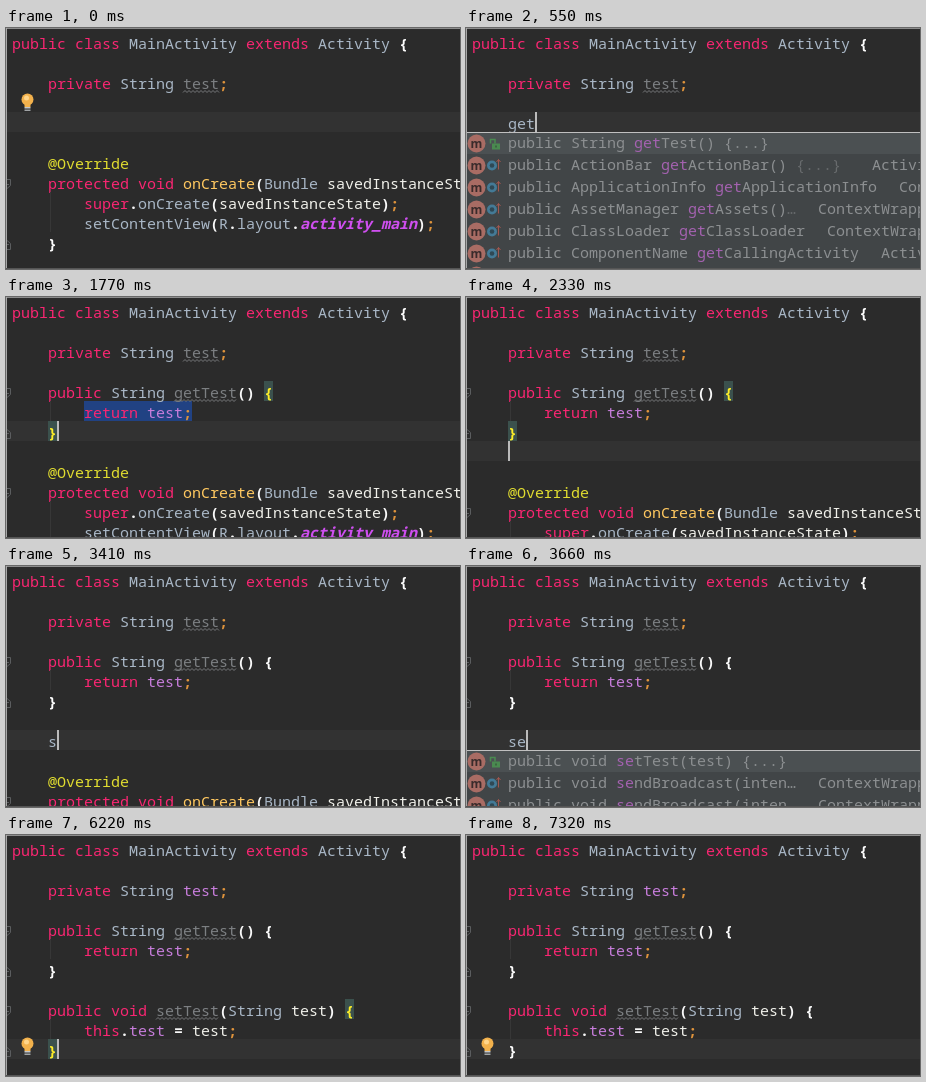
Animation of 454x241 px, one loop 7.42 s. Source, as an HTML page with a canvas:

```html
<!DOCTYPE html>
<html lang="en">
<head>
<meta charset="utf-8">
<title>Getter and setter completion</title>
<style>
  html, body { margin: 0; width: 100%; height: 100%; overflow: hidden; background: #2b2b2b; }
  canvas { display: block; }
</style>
</head>
<body>
<canvas id="stage" width="454" height="241"></canvas>
<script>
const ctx = document.getElementById('stage').getContext('2d');
const LOOP = 7420, CELL = 9, LINE = 20, LEFT = 6;
const MONO = '15px "Noto Sans Mono", "DejaVu Sans Mono", monospace';

const COLORS = {
  text: '#a9b7c6', key: '#f92672', brace: '#ffffff', match: '#ffef28', semi: '#e0943c',
  punct: '#f8f8f8', note: '#e0dc30', method: '#ffc860', field: '#c77ddb', unused: '#7c7f82',
  param: '#f0f0ea', res: '#cf4ff0', hit: '#a462b0', dim: '#686b6d', popup: '#8c8f91'
};
const BOLD = ['brace', 'match', 'semi', 'punct'];
// <style:text> sets a style by hand; the rest follows the syntax.
const TOKENS = /<(\w+):([^>]+)>|\b(public|class|extends|private|protected|void|return|super|this)\b|(@\w+)|([{}])|(;)|([().=])/g;
const SYNTAX = ['key', 'note', 'brace', 'semi', 'punct'];

const HEAD = ['public class MainActivity extends Activity {', ''];
const TAIL = [
  '', '    @Override',
  '    protected void <method:onCreate>(Bundle <param:savedInstanceState>) {',
  '        super.onCreate(<param:savedInstanceState>);',
  '        setContentView(R.layout.<res:activity_main>);',
  '    }'
];
const GET_ROWS = [
  ['public String <hit:get>Test() {...}'],
  ['public ActionBar <hit:get>ActionBar() <dim:{...}>', 'Activity', 406],
  ['public ApplicationInfo <hit:get>ApplicationInfo', 'Context', 433],
  ['public AssetManager <hit:get>Assets()<dim:…>', 'ContextWrapper', 352],
  ['public ClassLoader <hit:get>ClassLoader', 'ContextWrapper', 361],
  ['public ComponentName <hit:get>CallingActivity', 'Activity', 415],
  ['']
];
const SEND = ['public void <hit:se>ndBroadcast(inten…', 'ContextWrapper', 352];
const SE_ROWS = [['public void <hit:se>tTest(test) {...}'], SEND, SEND];
const SET_ROWS = [
  ['public void <hit:set>Test(test) {...}'],
  ['public void <hit:set>ContentView(view…', 'Activity', 406],
  ['public void <hit:set>ContentView(view…', 'Activity', 406]
];

// Last value whose start time has passed: [start, value, start, value, ...]
function at(t, steps) {
  let value;
  for (let i = 0; i < steps.length && t >= steps[i]; i += 2) value = steps[i + 1];
  return value;
}

function box(x, y, w, h, color) {
  ctx.fillStyle = color;
  ctx.fillRect(x, y, w, h);
}

function stroke(color, width, ...points) {
  ctx.strokeStyle = color;
  ctx.lineWidth = width;
  ctx.beginPath();
  points.forEach(([x, y]) => ctx.lineTo(x, y));
  ctx.stroke();
}

function disc(x, y, r, color) {
  ctx.fillStyle = color;
  ctx.beginPath();
  ctx.arc(x, y, r, 0, 7);
  ctx.fill();
}

function wave(x, y, width) {
  const points = [];
  for (let i = 0; i <= width; i += 2) points.push([x + i, y + (i % 4 ? 0 : 2)]);
  stroke('#77797b', 1, ...points);
}

function run(text, style, x, y) {
  const width = text.length * CELL;
  const face = BOLD.includes(style) ? 'bold ' : style === 'res' ? 'italic bold ' : '';
  if (style === 'match') box(x, y - 17, width, LINE, '#3b514d');
  ctx.font = face + MONO;
  ctx.fillStyle = COLORS[style];
  ctx.fillText(text, x, y);
  if (style === 'unused') wave(x, y + 1.5, width);
  return x + width;
}

function write(source, x, y, plain) {
  const base = plain ? 'popup' : 'text';
  let from = 0;
  for (const m of source.matchAll(TOKENS)) {
    x = run(source.slice(from, m.index), base, x, y);
    const kind = SYNTAX[m.slice(3).findIndex(Boolean)];
    x = run(m[2] || m[0], m[1] || (plain ? base : kind), x, y);
    from = m.index + m[0].length;
  }
  run(source.slice(from), base, x, y);
}

function fold(line, closing) {
  const y = line * LINE + 12, a = closing ? y + 9.5 : y - .5, d = closing ? -1 : 1;
  stroke('#5b5d5f', 1, [1, a], [4.5, a], [4.5, a + 6 * d], [1, a + 9 * d]);
  stroke('#5b5d5f', 1, [1, y + 4.5], [3, y + 4.5]);
}

function bulb(y) {
  disc(21.5, y + 6.5, 6, '#f2b14c');
  disc(20.5, y + 5, 2.5, '#ffd58a');
  box(18.5, y + 11, 6, 3, '#f2b14c');
  box(18.5, y + 14, 6, 1.5, '#c5c8ca');
  box(18.5, y + 16.5, 6, 1.5, '#a0a3a5');
}

function rowIcons(y, first) {
  disc(10.5, y, 9, '#a96c64');
  ctx.font = 'bold 12px "Noto Sans", sans-serif';
  ctx.fillStyle = '#3a2b2b';
  ctx.textAlign = 'center';
  ctx.fillText('m', 10.5, y + 4);
  ctx.textAlign = 'left';
  if (first) {
    box(26, y, 8, 6, '#4a8a50');
    stroke('#4a8a50', 1.5, [24.5, y], [24.5, y - 4], [29, y - 4], [29, y]);
    box(29.5, y + 2, 1, 2, '#304030');
  } else {
    disc(26, y, 5, '#447a96');
    disc(26, y, 2.3, '#2f4854');
    stroke('#a0574f', 1, [32.5, y + 4], [32.5, y - 6]);
    stroke('#a0574f', 1, [30.5, y - 3.5], [32.5, y - 6], [34.5, y - 3.5]);
  }
}

function popup(rows, top) {
  box(1, top, 453, 241 - top, '#414547');
  box(1, top, 453, 22, '#4b5052');
  box(1, top, 453, 1, '#c0c0c0');
  rows.forEach(([label, owner, x], i) => {
    const y = top + 22 * i;
    rowIcons(y + 11.5, !i);
    write(label, 42, y + 16, true);
    if (owner) write(owner, x, y + 16, true);
  });
}

function codeLines(t) {
  const field = t < 5080 ? '<unused:test>' : '<field:test>';
  const lines = [...HEAD, `    private String ${field};`, ''];
  const typed = at(t, [0, '', 280, 'g', 430, 'ge', 550, 'get', 1100, '', 3410, 's', 3660, 'se', 3810, 'set']);
  if (t < 1100) return [...lines, '    ' + typed, ...TAIL];

  const known = t >= 1500, lit = t >= 1770 && t < 2450;
  const brace = (c, on) => on ? `<match:${c}>` : c;
  lines.push(
    `    public String ${known ? '<unused:getTest>' : 'getTest'}() ${brace('{', lit)}`,
    `        return ${known ? '<field:test>' : 'test'};`,
    '    ' + brace('}', lit)
  );
  if (t >= 2330) lines.push('');
  if (t >= 2600 && t < 4650) lines.push('    ' + typed);
  if (t >= 4650) {
    const done = t >= 5080, on = t >= 5350 && t < 7320;
    const arg = done ? '<param:test>' : 'test';
    lines.push(
      `    public void ${done ? '<unused:setTest>' : 'setTest'}(String ${arg}) ${brace('{', on)}`,
      `        this.${done ? '<field:test>' : 'test'} = ${arg};`,
      '    ' + brace('}', on)
    );
  }
  return [...lines, ...TAIL];
}

function draw(t) {
  box(0, 0, 454, 241, '#2b2b2b');
  const current = at(t, [0, 4, 1100, 5, 1770, 6, 2330, 7, 2600, 8, 4650, 9, 5350, 10]);
  box(1, current * LINE + 4, 453, LINE, '#323232');
  if (t >= 1100 && t < 2050) box(78, 104, 12 * CELL, LINE, '#214283');
  if (t >= 4650 && t < 5350) box(78, 184, 17 * CELL, LINE, '#214283');

  const lines = codeLines(t);
  lines.forEach((line, i) => {
    if (line.startsWith('        ')) box(44, i * LINE + 4, 1, LINE, '#373737'); // indent guide
    write(line, LEFT, i * LINE + 21);
  });

  const start = lines.findIndex(line => line.includes('protected'));
  fold(start);
  fold(start + 3, true);
  if (t >= 1650) { fold(4); fold(6, true); }
  if (t >= 5200) { fold(8); fold(10, true); }

  const column = at(t, [0, 0, 280, 5, 430, 6, 550, 7, 1100, 8, 1770, 5, 2330, 4, 3410, 5, 3660, 6,
    3810, 7, 4370, 0, 4650, 8, 5350, 5, 6370, 0, 6890, 5, 7320, 0]);
  if (column) box(LEFT + column * CELL, current * LINE + 4, 2, LINE, '#bbbbbb');

  if (t < 280) bulb(65);
  if (t >= 6220) bulb(202);
  if (t >= 430 && t < 1100) {
    popup(t < 550 ? GET_ROWS.map(([s, ...rest]) => [s.replace('get>', 'ge>t'), ...rest]) : GET_ROWS, 104);
  }
  if (t >= 3660 && t < 4650) popup(t < 3810 ? SE_ROWS : SET_ROWS, 184);

  box(0, 0, 454, 1, '#8c8c8c');
  box(0, 0, 1, 241, '#a8a8a8');
  box(0, 240, 454, 1, '#555555');
}

function tick() {
  draw(performance.now() % LOOP);
  requestAnimationFrame(tick);
}
tick();
</script>
</body>
</html>
```
